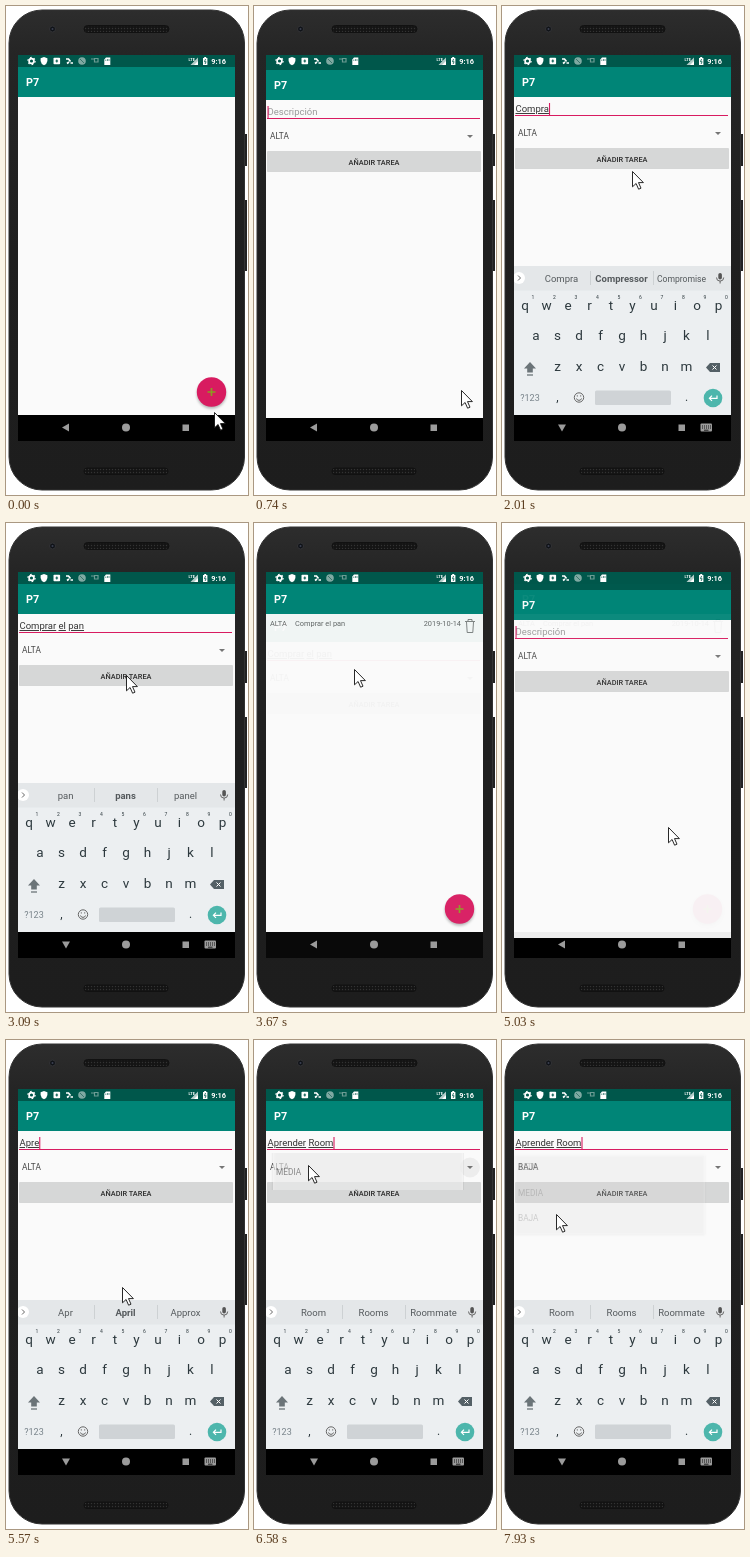
Write an HTML page that moves like this. It is 242x489 px and loops after 7990 ms.

```html
<!DOCTYPE html>
<html lang="es">
<head>
<meta charset="utf-8">
<title>P7</title>
<style>
html, body { margin: 0; width: 100%; height: 100%; overflow: hidden; background: #fff; }
svg { display: block; width: 242px; height: 489px; font-family: Roboto, sans-serif; }
text { white-space: pre; }
.sm { font-size: 7.4px; }
.opt { font-size: 8.3px; }
.md { font-size: 9.5px; }
.mid { text-anchor: middle; }
.med { font-weight: 500; }
.ink { fill: #444; }
.line { fill: none; stroke: #666; }
</style>
</head>
<body>
<svg viewBox="0 0 242 489">
  <defs>
    <linearGradient id="body" x2="0" y2="1">
      <stop stop-color="#2d2d2d"/><stop offset=".09" stop-color="#252525"/>
      <stop offset=".5" stop-color="#1f1f1f"/><stop offset="1" stop-color="#1d1d1d"/>
    </linearGradient>
    <pattern id="mesh" width="3" height="3" patternUnits="userSpaceOnUse">
      <rect width="3" height="3" fill="#141414"/><circle cx="1.5" cy="1.5" r=".7" fill="#333"/>
    </pattern>
    <filter id="blur" x="-30%" y="-30%" width="160%" height="160%"><feGaussianBlur stdDeviation="1.6"/></filter>
    <clipPath id="screen"><rect x="12" y="49" width="217" height="386"/></clipPath>
    <clipPath id="aboveNav"><rect x="12" y="49" width="217" height="360"/></clipPath>
    <clipPath id="reveal"><rect id="revealBox" x="9" y="113" width="201" height="86"/></clipPath>
    <g id="window">
      <rect x="12" y="91" width="217" height="318" fill="#fafafa"/>
      <rect x="12" y="49" width="217" height="12" fill="#00574b"/>
      <rect x="12" y="61" width="217" height="30" fill="#008577"/>
      <text x="20" y="80.2" font-weight="700" font-size="10.8" fill="#fff">P7</text>
      <rect x="12" y="409" width="217" height="26"/>
    </g>
  </defs>

  <g id="phone">
    <path d="M238 128h3v32h-3zM238 194h3v71h-3z" fill="#222"/>
    <rect x="3" y="4" width="235.5" height="480" rx="33" fill="url(#body)" stroke="#333"/>
    <rect x="78" y="19.5" width="85" height="7" rx="3.5" fill="url(#mesh)" stroke="#111"/>
    <rect x="78" y="462" width="84" height="6.5" rx="3" fill="url(#mesh)" stroke="#111"/>
    <circle cx="46.5" cy="23" r="3" fill="#101318" stroke="#333336"/>
    <circle cx="46.5" cy="23" r="1" fill="#3b4152"/>
  </g>

  <g clip-path="url(#screen)">
    <use href="#window"/>
    <g id="row" class="sm" fill="#666">
      <text x="16" y="103.2">ALTA</text>
      <text x="41" y="103.2">Comprar el pan</text>
      <text x="207" y="103.2" text-anchor="end">2019-10-14</text>
      <path d="M211 98.5h10M214 98v-1.500h4v1.500M212.500 99l.7 10.500h5.600l.7-10.500" class="line" stroke-width=".8"/>
    </g>
    <circle cx="205.5" cy="388" r="14.5" opacity=".3" filter="url(#blur)"/>
    <circle cx="205.5" cy="386" r="14.7" fill="#d81b60"/>
    <circle id="fabRipple" cx="205.5" cy="386" r="14.7" fill="#fff"/>
    <path d="M201.500 386h8M205.500 382v8" stroke="#8c9a22" stroke-width="1.7"/>

    <g id="form">
      <use href="#window"/>
      <text id="hint" x="13.5" y="106" class="md" fill="#999">Descripción</text>
      <text id="typed" x="13.5" y="106" class="md" fill="#333"></text>
      <path d="M13 109.500h213" stroke="#d81b60"/>
      <rect id="caret" y="97" width="1.1" height="12" fill="#d81b60"/>
      <circle id="spinRipple" cx="216" cy="127.5" r="10"/>
      <text id="choice" x="16" y="130.2" class="opt ink">ALTA</text>
      <path d="M213 126h6l-3 3z" fill="#757575"/>
      <rect x="13" y="143" width="214" height="20" rx="1" opacity=".15"/>
      <rect id="button" x="13" y="142" width="214" height="20.5" rx="1"/>
      <text x="120" y="155.5" class="sm med mid" fill="#2c2c2c">AÑADIR TAREA</text>
    </g>

    <g id="popup" clip-path="url(#reveal)">
      <g id="menu">
        <rect class="fade" x="13" y="115" width="190" height="80" fill-opacity=".22" filter="url(#blur)"/>
        <rect class="fade" x="13" y="114" width="190" height="80" rx="1" fill="#fff"/>
        <rect id="pick" x="13" y="167" width="190" height="25"/>
        <g class="fade opt ink">
          <text x="16" y="130.2">ALTA</text>
          <text x="16" y="156">MEDIA</text>
          <text x="16" y="181.2">BAJA</text>
        </g>
      </g>
    </g>

    <g clip-path="url(#aboveNav)"><g id="keyboard">
      <rect x="12" y="260" width="217" height="149" fill="#eceff1"/>
      <rect x="12" y="260" width="217" height="24.5" fill="#e4e7e9"/>
      <circle cx="17" cy="272" r="6" fill="#fff"/>
      <path d="M16 269.500l2.500 2.500-2.500 2.500" class="line"/>
      <path d="M88.500 265v14M151.500 265v14" stroke="#cdd1d3"/>
      <g id="words" class="md mid" fill="#54595c"></g>
      <rect x="216.3" y="267" width="3.6" height="6.5" rx="1.8" fill="#555"/>
      <path d="M214.500 271.500a3.600 3.600 0 0 0 7.200 0M218.100 275v2.500" class="line"/>
      <g id="keys" class="mid" fill="#2c383d"></g>
      <path d="M28 356l6 6.500h-3.200v4h-5.600v-4h-3.200z" fill="#6b7478"/>
      <path d="M25 369h6" stroke="#6b7478" stroke-width="1.3"/>
      <path d="M204 361.500l4-4.500h10v9h-10z" fill="#546066"/>
      <path d="M210.500 359.500l4 4m0-4l-4 4" stroke="#fff"/>
      <circle cx="77" cy="391.5" r="4.7" class="line"/>
      <path d="M74.500 392.500a2.600 2.600 0 0 0 5 0M75.300 389.300v1.200M78.700 389.300v1.200" class="line"/>
      <rect x="93" y="384.5" width="76" height="14.5" rx="1.5" fill="#cfd3d6"/>
      <circle cx="211" cy="392" r="9.3" fill="#4db6ac"/>
      <path d="M215 389.500v2.800h-7.500m2.500-2.600l-2.600 2.600 2.600 2.600" fill="none" stroke="#fff" stroke-width="1.2"/>
    </g></g>

    <g fill="#9b9b9b">
      <path id="back" d="M56 421.500l7-4v8z"/>
      <circle cx="120" cy="421.5" r="4"/>
      <rect x="176.5" y="418.5" width="6.5" height="6.5"/>
      <g id="imeIcon">
        <rect x="198.5" y="417.5" width="11.5" height="8" rx="1"/>
        <path d="M200 420h9M200 422h9" stroke="#000" stroke-width=".9" stroke-dasharray="1 1"/>
        <path d="M202 424.200h4.500" stroke="#000" stroke-width=".8"/>
      </g>
    </g>

    <g fill="#fff">
      <circle cx="25.5" cy="55" r="2.4" fill="none" stroke="#fff" stroke-width="1.7"/>
      <circle cx="25.5" cy="55" r="3.6" fill="none" stroke="#fff" stroke-width="1.2" stroke-dasharray="1.6 2.17"/>
      <path d="M38 51l3.400 1.300v2.700q-.4 3-3.400 4.200-3-1.200-3.400-4.200v-2.700z"/>
      <rect x="47.5" y="51.7" width="6.6" height="6.6" rx=".8"/>
      <path d="M50.800 53.500v3M49.500 55h2.600" stroke="#00574b"/>
      <path d="M60 53h2.500l2 2.500M64.500 57h2.500M61 57.500l2-1.500" fill="none" stroke="#fff" stroke-width="1.7"/>
      <circle cx="76" cy="55" r="3.8" fill="#7fa9a2"/>
      <path d="M74 53l4 4" stroke="#39766c"/>
      <path d="M85 53h3.500v3h3.500v-3.500h-4" fill="none" stroke="#6d9c94" stroke-width="1.2"/>
      <path d="M100 51.500h4.300v7.500h-6v-5.500z"/>
      <path d="M99.800 53.500v1.500M101.500 53v2M103 53v2" stroke="#00574b" stroke-width=".6"/>
      <text x="182.5" y="55" font-size="4" font-weight="700">LTE</text>
      <path d="M192 51.500v7.500h-7.500z" opacity=".7"/>
      <path d="M192 55v4h-4z"/>
      <path d="M197 52h1.200v-1h2v1h1.200v7h-4.400z"/>
      <path d="M199.600 53l-1.200 2.700h1.700l-1 2.300" fill="none" stroke="#00574b" stroke-width=".8"/>
      <text x="205.3" y="57.8" class="sm" font-weight="700">9:16</text>
    </g>
  </g>

  <path id="cursor" d="M.5.5v15.300l3.600-3.300 2.500 5.700 2.400-1-2.500-5.600h4.900z" fill="#fff" stroke="#111" stroke-width=".9"/>
</svg>

<script>
const LOOP = 7990, TICK = 75;
const $ = id => document.getElementById(id);
const clamp = (v, lo = 0, hi = 1) => Math.min(hi, Math.max(lo, v));
const set = (id, attrs) => { for (const k in attrs) $(id).setAttribute(k, attrs[k]); };
const show = (id, on) => set(id, { visibility: on ? 'visible' : 'hidden' });
const move = (id, x, y) => set(id, { transform: `translate(${Math.round(x)} ${Math.round(y)})` });
const within = (n, a, b) => n >= a && n < b;

// Linear interpolation through [tick, value...] stops
function track(n, stops) {
  const i = stops.findIndex(s => s[0] > n);
  if (i < 0) return stops[stops.length - 1].slice(1);
  if (!i) return stops[0].slice(1);
  const a = stops[i - 1], b = stops[i], p = (n - a[0]) / (b[0] - a[0]);
  return a.slice(1).map((v, j) => v + (b[j + 1] - v) * p);
}

function addText(parent, text, x, y, attrs = {}) {
  const el = document.createElementNS('http://www.w3.org/2000/svg', 'text');
  Object.entries({ x, y, ...attrs }).forEach(([k, v]) => el.setAttribute(k, v));
  el.textContent = text;
  $(parent).append(el);
}

[['qwertyuiop', 23, 303.6], ['asdfghjkl', 34, 334.3], ['zxcvbnm', 55.5, 365.3]].forEach(([row, x, y]) =>
  [...row].forEach((c, i) => addText('keys', c, x + i * 21.5, y, { 'font-size': 13.5 })));
[...'1234567890'].forEach((c, i) => addText('keys', c, 31 + i * 21.5, 293, { 'font-size': 5 }));
addText('keys', '?123', 28, 395, { 'font-size': 9, fill: '#78838a' });
addText('keys', ',', 55.5, 395, { 'font-size': 12 });
addText('keys', '.', 184.5, 395, { 'font-size': 12 });

const tasks = ['Comprar el pan', 'Aprender Room'];
const hints = [
  [[0], [1, 'C', 'Can', 'Call'], [3, 'Com', 'Come', 'Coming'], [5, 'Compr', 'Compressor', 'Compromise'],
   [6, 'Compra', 'Compressor', 'Compromise'], [7, 'Comprar', 'Compare', 'Compact'],
   [9, 'e', 'el', 'email'], [12, 'pa', 'part', 'pan'], [14, 'pan', 'pans', 'panel']],
  [[0], [1, 'A', 'And', 'All'], [3, 'Apr', 'April', 'Approx'], [6, 'Aprend', 'Aprender', 'Apron'],
   [10, 'R', 'Right', 'Really'], [13, 'Room', 'Rooms', 'Roommate']]
];

let lastText = null;
function setTyped(text, k) {
  if (text === lastText) return;
  lastText = text;
  $('typed').innerHTML = text.replace(/\S+/g, '<tspan text-decoration="underline">$&</tspan>');
  $('words').replaceChildren();
  const words = hints[k].filter(h => h[0] <= text.length).pop().slice(1);
  words.forEach((w, i) => addText('words', w, 59.5 + i * 60, 275.5, {
    'font-weight': i === 1 && w !== 'Rooms' ? 700 : 400,
    'font-size': w === 'Compromise' ? 8.6 : 9.5
  }));
}

const cursorPath = [
  [0, 208, 406], [3, 207, 384], [10, 207, 384], [13, 130, 157], [14, 130, 157], [15, 130, 165],
  [39, 130, 165], [41, 120, 152], [43, 118, 150], [48, 100, 146], [51, 100, 146], [56, 199, 378],
  [57, 199, 378], [58, 199, 379], [65, 199, 379], [67, 166, 304], [70, 116, 247], [82, 116, 247],
  [83, 54, 125], [91, 54, 125], [96, 54, 173], [97, 54, 173], [98, 54, 174]
];
const keyboardLift = [[21, 0], [22, .4], [23, .85], [24, 1], [43, 1], [46, 0], [70, 0], [71, .4], [72, .85], [73, 1]];
const fabGlow = [[4, 0], [5, .15], [6, .25], [9, .25], [14, 0], [62, 0], [64, .25], [66, .25], [70, 0]];

// Form window: rises while fading in, drops while fading out
function formState(ms, n) {
  if (n < 9 || within(n, 51, 66)) return [0, 0];
  if (within(n, 46, 51)) {
    const age = ms - 3430;
    return [31 * clamp(age / 250) ** 5, 1 - clamp((age - 100) / 150)];
  }
  const age = ms - (n < 46 ? 615 : 4930);
  return [31 * (1 - clamp(age / 350)) ** 5, clamp(age / 100)];
}

function render(t) {
  const n = Math.floor((t + 20) / TICK), ms = n * TICK;
  const [dy, alpha] = formState(ms, n);
  move('form', 0, dy);
  set('form', { opacity: alpha });
  show('row', n >= 46);
  set('fabRipple', { opacity: track(n, fabGlow)[0] });

  const k = n < 51 ? 0 : 1;
  const count = k ? Math.round(1.5 * (n - 72)) + 1 : n - 21;
  const text = tasks[k].slice(0, Math.max(0, count));
  setTyped(text, k);
  show('hint', !text);
  set('caret', { x: 13.5 + (text ? $('typed').getComputedTextLength() : 0) });
  show('caret', !(within(n, 15, 19) || within(n, 40, 51)));
  set('button', { fill: within(n, 43, 46) ? '#c2c3c3' : '#d6d7d7' });
  set('spinRipple', { opacity: within(n, 87, 93) ? .05 : 0 });
  $('choice').textContent = n >= 105 ? 'BAJA' : 'ALTA';

  const lift = track(n, keyboardLift)[0];
  show('keyboard', lift > 0);
  move('keyboard', 0, 149 * (1 - lift));
  const ime = within(n, 19, 46) || n >= 70;
  show('imeIcon', ime);
  set('back', { transform: ime ? 'rotate(-90 60 421.5)' : '' });

  const open = track(n, [[88, 0], [89, .6], [90, 1]])[0];
  const fade = track(n, [[88, .6], [89, .9], [90, 1], [104, 1], [105, .6], [106, .22]])[0];
  show('popup', n >= 88);
  move('menu', 6 * (1 - open), -21 * (1 - open));
  set('revealBox', { height: 37 + 49 * open });
  document.querySelectorAll('.fade').forEach(el => el.setAttribute('opacity', fade));
  set('pick', { opacity: n === 104 ? .1 : 0 });

  move('cursor', ...track(n, cursorPath));
}

const start = performance.now();
(function frame() {
  render((performance.now() - start) % LOOP);
  requestAnimationFrame(frame);
})();
</script>
</body>
</html>
```
